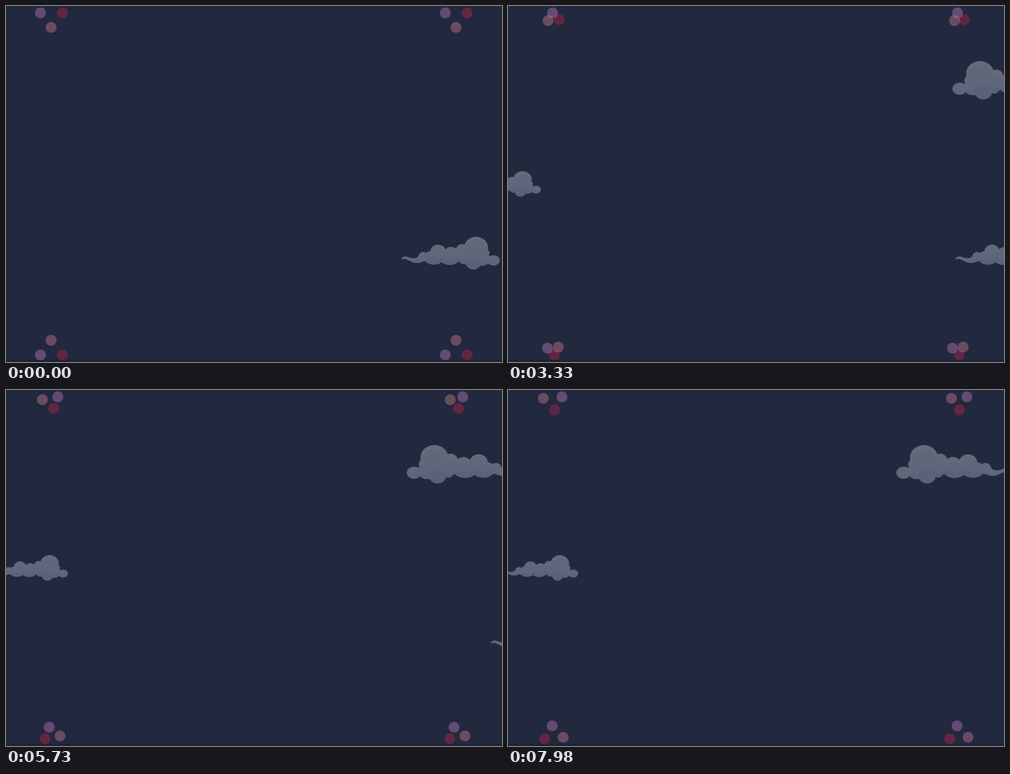
An HTML page that plays this animation: 883x634 px, repeating every 8000 ms.

```html
<!DOCTYPE html>
<html lang="en">
<head>
<meta charset="utf-8">
<title>Night clouds</title>
<style>
  html, body { margin: 0; width: 100%; height: 100%; overflow: hidden; background: #22283d; }
  svg { display: block; width: 883px; height: 634px; }

  /* Out until 7200 ms, then one ninth of the way back before the restart. */
  .drift { animation: drift 8s linear infinite; }
  @keyframes drift {
    0% { transform: translate(0, 0); }
    90% { transform: translate(var(--dx), var(--dy)); }
    100% { transform: translate(calc(var(--dx) * 8 / 9), calc(var(--dy) * 8 / 9)); }
  }
  .cloud { --dx: 200px; --dy: 0px; }

  circle { r: 9.8px; fill-opacity: .4; }
  .red { fill: #c2234c; }
  .mauve { fill: #d68299; }
  .purple { fill: #c680c6; }

  .top .red { --dx: -19.5px; --dy: 26px; }
  .top .mauve { --dx: -19.5px; --dy: -26px; }
  .top.right .mauve { --dx: -13px; }
  .top .purple { --dx: 39px; --dy: 0px; }
  .bottom .red { --dx: -39px; --dy: 0px; }
  .bottom .mauve { --dx: 20px; --dy: 26px; }
  .bottom .purple { --dx: 19.5px; --dy: -26px; }
</style>
</head>
<body>
<svg viewBox="0 0 883 634">
  <defs>
    <linearGradient id="puff" gradientUnits="userSpaceOnUse" x1="0" y1="0" x2="0" y2="58">
      <stop offset="0" stop-color="#696b76"/>
      <stop offset=".4" stop-color="#626979"/>
      <stop offset="1" stop-color="#5c657a"/>
    </linearGradient>
    <g id="cloud">
      <g fill="#5a627a">
        <ellipse cx="58" cy="37" rx="18" ry="12.7"/>
        <ellipse cx="86" cy="37.5" rx="18.5" ry="12.7"/>
        <ellipse cx="112" cy="40" rx="10" ry="9.3"/>
        <ellipse cx="128" cy="46" rx="13.5" ry="12.4"/>
        <ellipse cx="144" cy="39.5" rx="14" ry="12.3"/>
        <path d="M52 28H152V44H52Z"/>
      </g>
      <g fill="url(#puff)">
        <path d="M0 40.5C0 36 6 33.5 12 36C20 39.5 27 39 31 34L41 42C36 47.5 25 48 18 44.5C11 40.5 5 38 0 40.5Z"/>
        <ellipse cx="39" cy="35.5" rx="9" ry="8.5"/>
        <ellipse cx="50" cy="33" rx="6" ry="6"/>
        <ellipse cx="65.3" cy="26" rx="13.7" ry="12"/>
        <ellipse cx="88.5" cy="29" rx="12.5" ry="11"/>
        <ellipse cx="108" cy="24" rx="11" ry="11"/>
        <ellipse cx="133" cy="19" rx="21.3" ry="19"/>
        <ellipse cx="151" cy="29" rx="6" ry="6.5"/>
        <ellipse cx="164" cy="42" rx="11.2" ry="9.2"/>
      </g>
      <g fill="#5e677b">
        <ellipse cx="133" cy="22" rx="17" ry="14.5"/>
        <ellipse cx="110" cy="33" rx="14" ry="9"/>
        <ellipse cx="86" cy="34" rx="13" ry="7"/>
        <ellipse cx="60" cy="34" rx="13" ry="7"/>
        <ellipse cx="147" cy="37" rx="11" ry="7"/>
      </g>
    </g>
    <g id="dots-top"></g>
  </defs>

  <rect width="883" height="634" fill="#22283d"/>
  <rect y="631" width="883" height="3" fill="#1c2134"/>

  <g transform="translate(703.8 411)"><use href="#cloud" class="cloud drift"/></g>
  <g transform="translate(1103 98) scale(-1.165 1.175)"><use href="#cloud" class="cloud drift"/></g>
  <g transform="translate(-149.2 294.3) scale(.776)"><use href="#cloud" class="cloud drift"/></g>

  <g class="top">
    <circle class="red drift" cx="100.3" cy="12.2"/>
    <circle class="mauve drift" cx="80.3" cy="38"/>
    <circle class="purple drift" cx="61.3" cy="12.2"/>
  </g>
  <g class="top right" transform="translate(720.8)">
    <circle class="red drift" cx="100.3" cy="12.2"/>
    <circle class="mauve drift" cx="80.3" cy="38"/>
    <circle class="purple drift" cx="61.3" cy="12.2"/>
  </g>
  <g class="bottom">
    <circle class="red drift" cx="100.3" cy="621.2"/>
    <circle class="mauve drift" cx="80.3" cy="595.3"/>
    <circle class="purple drift" cx="61.3" cy="621.2"/>
  </g>
  <g class="bottom" transform="translate(720.8)">
    <circle class="red drift" cx="100.3" cy="621.2"/>
    <circle class="mauve drift" cx="80.3" cy="595.3"/>
    <circle class="purple drift" cx="61.3" cy="621.2"/>
  </g>
</svg>
</body>
</html>
```
